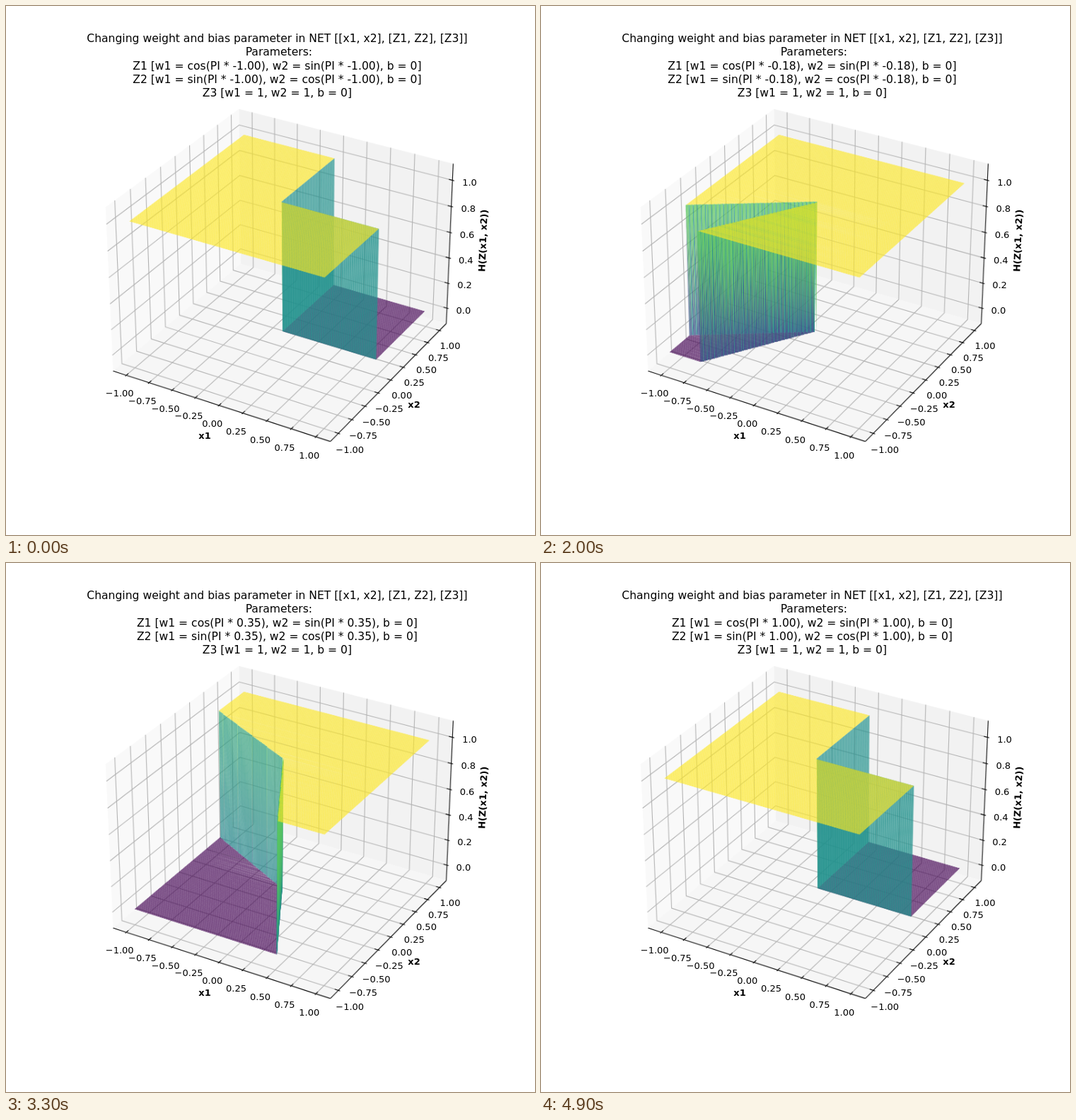
An HTML page with a canvas that plays this animation: 748x748 px, repeating every 5 s.

```html
<!DOCTYPE html>
<html lang="en">
<head>
<meta charset="utf-8">
<title>Network surface</title>
<style>
  html, body { margin: 0; width: 100%; height: 100%; overflow: hidden; background: #fff; }
  canvas, svg { position: absolute; left: 0; top: 0; width: 748px; height: 748px; }
  text { font-family: "DejaVu Sans", sans-serif; font-size: 12.99px; text-anchor: middle; fill: #000; }
  .title { font-size: 15.58px; white-space: pre; }
  .bold { font-weight: bold; }
</style>
</head>
<body>
<canvas id="view" width="748" height="748"></canvas>
<svg id="labels" viewBox="0 0 748 748"></svg>
<script>
const SIZE = 748, PLOT = 800, STEPS = 50, STEP_MS = 100;
const ALPHA = 0.8;
const A = 0.5654, H = 0.4241;           // half size of the axes box
const N = 200, D = (-1 + 0.01) + 1;     // sample count and spacing
const COLORS = ['68,1,84', '59,82,139', '33,145,140', '94,201,98', '253,231,37'];

const wx = v => v * 0.49345;
const wz = v => (v - 0.5) * 0.6785;
const coord = Array.from({ length: N }, (_, i) => -1 + i * D);

// Perspective view: elevation 30, azimuth -60, distance 10.
function project(x, y, z) {
  const s = 3330 / (10 - (0.4330 * x - 0.75 * y + 0.5 * z));
  return [418.3 + s * (0.8660 * x + 0.5 * y),
          395.7 - s * (-0.25 * x + 0.4330 * y + 0.8660 * z)];
}

function layer(size) {
  const c = document.createElement('canvas');
  c.width = c.height = size;
  return c.getContext('2d', { willReadFrequently: true });
}

function trace(g, points, closed) {
  points.forEach((p, i) => i ? g.lineTo(p[0], p[1]) : g.moveTo(p[0], p[1]));
  if (closed) g.closePath();
}

function polygon(g, points, color) {
  g.beginPath();
  trace(g, points, true);
  g.fillStyle = color;
  g.fill();
}

function line(g, color, ...points) {
  g.beginPath();
  trace(g, points.map(p => project(...p)));
  g.strokeStyle = color;
  g.lineWidth = 1.11;
  g.stroke();
}

const rgba = k => `rgba(${COLORS[k]},${ALPHA})`;

// Projected sample points on the lower and upper level.
const nodes = [0, 1].map(h => coord.map(y => coord.map(x => project(wx(x), wx(y), wz(h)))));

// A complete flat sheet, built cell by cell.
function sheet(h) {
  const g = layer(PLOT), p = nodes[h];
  for (let j = 0; j < N - 1; j++)
    for (let i = 0; i < N - 1; i++)
      polygon(g, [p[j][i], p[j][i + 1], p[j + 1][i + 1], p[j + 1][i]], rgba(h * 4));
  return g.canvas;
}

const svg = document.getElementById('labels');
function label(str, x, y, cls = '', turn = 0) {
  const t = document.createElementNS('http://www.w3.org/2000/svg', 'text');
  t.setAttribute('transform', `translate(${x} ${y}) rotate(${turn})`);
  t.setAttribute('class', cls);
  t.textContent = str;
  svg.append(t);
  return t;
}

function tickLabel(value, digits, point, dy) {
  const [x, y] = project(...point).map(v => v * SIZE / PLOT);
  label(value.toFixed(digits).replace('-', '\u2212'), x, y + dy + 4.7);
}

function drawAxes() {
  const g = layer(PLOT), grid = '#b0b0b0', ink = '#000';
  const pane = (shade, ...pts) => polygon(g, pts.map(p => project(...p)), `rgb(${shade},${shade},${shade})`);
  g.fillStyle = '#fff';
  g.fillRect(0, 0, PLOT, PLOT);
  pane(249, [-A, -A, -H], [-A, A, -H], [-A, A, H], [-A, -A, H]);
  pane(242, [-A, A, -H], [A, A, -H], [A, A, H], [-A, A, H]);
  pane(246, [-A, -A, -H], [A, -A, -H], [A, A, -H], [-A, A, -H]);

  const flat = Array.from({ length: 9 }, (_, i) => -1 + i / 4);
  const high = Array.from({ length: 6 }, (_, i) => i / 5);
  const inner = 0.0181, outer = 0.009, gap = 0.058;
  for (const t of flat) {
    const v = wx(t);
    line(g, grid, [v, -A, -H], [v, A, -H], [v, A, H]);
    line(g, grid, [A, v, -H], [-A, v, -H], [-A, v, H]);
  }
  for (const t of high) line(g, grid, [-A, -A, wz(t)], [-A, A, wz(t)], [A, A, wz(t)]);

  line(g, ink, [-A, -A, -H], [A, -A, -H]);
  line(g, ink, [A, -A, -H], [A, A, -H]);
  line(g, ink, [A, A, -H], [A, A, H]);
  for (const t of flat) {
    const v = wx(t);
    line(g, ink, [v, -A + inner, -H], [v, -A - outer, -H]);
    line(g, ink, [A - inner, v, -H], [A + outer, v, -H]);
    tickLabel(t, 2, [v, -A - gap, -H - gap], 1.7);
    tickLabel(t, 2, [A + gap, v, -H - gap], 1.7);
  }
  for (const t of high) {
    line(g, ink, [A - inner, A, wz(t)], [A + outer, A, wz(t)]);
    tickLabel(t, 1, [A + gap, A + gap, wz(t)], 6);
  }
  label('x1', 281, 612, 'bold');
  label('x2', 577, 568, 'bold');
  label('H(Z(x1, x2))', 679, 332, 'bold', -87.7);
  return g.canvas;
}

const axes = drawAxes();
const sheets = [sheet(0), sheet(1)];
const titles = [
  'Changing weight and bias parameter in NET [[x1, x2], [Z1, Z2], [Z3]]',
  ' Parameters:', '', '', 'Z3 [w1 = 1, w2 = 1, b = 0]'
].map((s, i) => label(s, 383.4, 50.8 + i * 19.4, 'title'));

const plot = layer(PLOT);
const view = document.getElementById('view').getContext('2d', { willReadFrequently: true });
view.imageSmoothingQuality = 'high';

function drawSheet(h, sums) {
  const p = nodes[h];
  plot.save();
  plot.beginPath();
  for (let j = 0; j < N - 1; j++) {
    for (let i = 0; i < N - 1; i++) {
      const from = i;
      while (i < N - 1 && sums[j][i] === h * 4) i++;
      if (i > from) trace(plot, [p[j][from], p[j][i], p[j + 1][i], p[j + 1][from]], true);
    }
  }
  plot.clip();
  plot.drawImage(sheets[h], 0, 0);
  plot.restore();
}

function render(step) {
  const p = -1 + 2 * step / (STEPS - 1);
  const c = Math.cos(Math.PI * p), s = Math.sin(Math.PI * p);
  const out = coord.map(y => coord.map(x => +(c * x + s * y > 0 || s * x + c * y > 0)));
  const sums = [], walls = [];
  for (let j = 0; j < N - 1; j++) {
    sums[j] = [];
    for (let i = 0; i < N - 1; i++) {
      const sum = out[j][i] + out[j][i + 1] + out[j + 1][i + 1] + out[j + 1][i];
      sums[j][i] = sum;
      if (sum % 4) {
        const depth = 0.433 * wx(coord[i]) - 0.75 * wx(coord[j]) + 0.5 * wz(sum / 4);
        walls.push({ i, j, sum, depth });
      }
    }
  }
  walls.sort((a, b) => a.depth - b.depth);

  const node = (j, i) => nodes[out[j][i]][j][i];
  plot.drawImage(axes, 0, 0);
  drawSheet(0, sums);
  for (const { i, j, sum } of walls)
    polygon(plot, [node(j, i), node(j, i + 1), node(j + 1, i + 1), node(j + 1, i)], rgba(sum));
  drawSheet(1, sums);
  view.drawImage(plot.canvas, 0, 0, SIZE, SIZE);

  const v = p.toFixed(2);
  titles[2].textContent = `Z1 [w1 = cos(PI * ${v}), w2 = sin(PI * ${v}), b = 0]`;
  titles[3].textContent = `Z2 [w1 = sin(PI * ${v}), w2 = cos(PI * ${v}), b = 0]`;
}

const start = performance.now();
let shown = -1;
function tick() {
  const step = Math.floor(Math.max(0, performance.now() - start) / STEP_MS) % STEPS;
  if (step !== shown) render(shown = step);
  requestAnimationFrame(tick);
}
tick();
</script>
</body>
</html>
```
